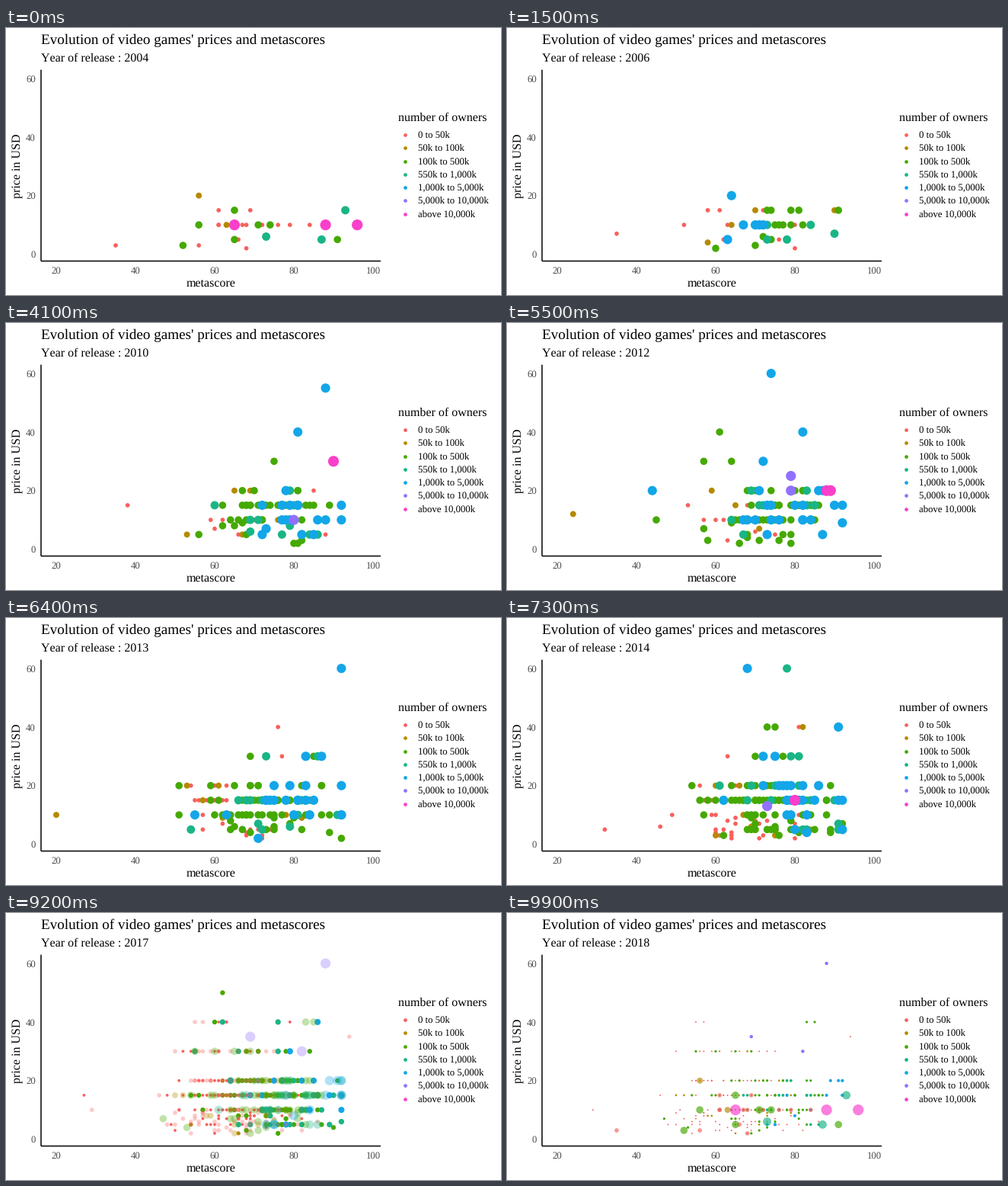
A matplotlib script for the animation above (10 s loop, 650x350 px).

```python
import matplotlib.pyplot as plt
import numpy as np
from matplotlib.animation import FuncAnimation
from matplotlib.colors import to_rgba

W, H, DPI = 650, 350, 100
PT = 72 / DPI  # points per pixel

plt.rcParams["font.family"] = "Liberation Serif"
plt.rcParams["text.hinting"] = "no_hinting"
plt.rcParams["text.kerning_factor"] = 6  # plain, unkerned spacing

OWNERS = ["0 to 50k", "50k to 100k", "100k to 500k", "550k to 1,000k",
          "1,000k to 5,000k", "5,000k to 10,000k", "above 10,000k"]
COLORS = ["#F8605C", "#B58900", "#45A900", "#1AB586",
          "#13A6E8", "#9270FF", "#FA3FCB"]
RED, GOLD, GREEN, TEAL, BLUE, PURPLE, PINK = range(7)
RGBA = np.array([to_rgba(c) for c in COLORS])
# Dot areas grow in equal steps from the smallest to the largest class.
RADII = 1.067 * np.sqrt(np.linspace(4, 36, 7)) + 0.704

YEARS = range(2004, 2019)

# Releases per owner class at a few years, interpolated in between.
KEY_YEARS = [2004, 2008, 2012, 2016, 2018]
COUNTS = {
    RED: [14, 7, 11, 110, 120],
    GOLD: [2, 6, 7, 22, 16],
    GREEN: [6, 24, 60, 85, 70],
    TEAL: [0, 10, 13, 25, 16],
    BLUE: [0, 13, 21, 30, 12],
}

# The dots that stand out: best sellers, highest prices, lowest scores.
LANDMARKS = {
    2004: [(RED, 35, 3), (GREEN, 52, 3), (TEAL, 73, 6), (TEAL, 87, 5),
           (TEAL, 93, 15), (PINK, 65, 10), (PINK, 88, 10), (PINK, 96, 10)],
    2006: [(RED, 35, 7)],
    2008: [(GREEN, 50, 2), (GREEN, 64, 40), (GREEN, 80, 30),
           (PURPLE, 89, 10)],
    2009: [(RED, 29, 10)],
    2010: [(RED, 38, 15), (BLUE, 81, 40), (BLUE, 88, 55),
           (PURPLE, 80, 10), (PINK, 90, 30)],
    2011: [(GOLD, 23, 10)],
    2012: [(GOLD, 24, 12), (BLUE, 44, 20), (BLUE, 74, 60), (BLUE, 82, 40),
           (PURPLE, 79, 20), (PURPLE, 79, 25), (PINK, 88, 20),
           (PINK, 89, 20)],
    2013: [(GOLD, 20, 10)],
    2014: [(RED, 32, 5), (BLUE, 68, 60), (TEAL, 78, 60),
           (PURPLE, 73, 13), (PINK, 80, 15)],
    2016: [(RED, 36, 10), (BLUE, 61, 60), (BLUE, 86, 60),
           (PURPLE, 71, 20), (PURPLE, 77, 15), (PURPLE, 83, 15),
           (PINK, 83, 25)],
    2017: [(RED, 27, 15)],
    2018: [(RED, 29, 10), (RED, 94, 35), (PURPLE, 69, 35),
           (PURPLE, 82, 30), (PURPLE, 88, 60)],
}
PRICES = np.array([5, 10, 15, 20, 30, 40, 50, 60])


def releases(year):
    """Rows of (owner class, metascore, price), small dots first."""
    rng = np.random.default_rng(year)
    age = year - YEARS[0]
    # Prices peak around a typical price; both it and the tail grow.
    weights = np.exp(-abs(PRICES - 10 - 0.4 * age) / (3 + 0.45 * age))
    weights /= weights.sum()
    rows = list(LANDMARKS.get(year, []))
    for owner, keys in COUNTS.items():
        n = round(np.interp(year, KEY_YEARS, keys))
        score = np.clip(rng.normal(66 + 3.5 * owner, 8.5, n).round(), 45, 92)
        price = rng.choice(PRICES, n, p=weights)
        bargain = rng.random(n) < 0.28 - 0.06 * owner
        price = np.where(bargain, rng.integers(2, 10, n), price)
        rows += zip([owner] * n, score, price)
    return np.array(sorted(rows, key=lambda row: row[0]))


def x_px(score):
    return 66 + (score - 20) * 5.2


def y_px(price):
    return 296.5 - price * 3.84


def build(year):
    owner, score, price = releases(year).T
    owner = owner.astype(int)
    xy = np.column_stack([x_px(score), y_px(price)])
    return xy, RADII[owner], RGBA[owner]


states = [build(year) for year in YEARS]

# Timeline: every year holds, then gives way to the next in three steps.
FRAMES, STEPS = 100, 3
HOLDS = [4] * 11 + [3] * 4
timeline = []
for i, hold in enumerate(HOLDS):
    timeline += [(i, 0)] * hold
    timeline += [(i, j / STEPS) for j in range(1, STEPS)]
    timeline.append(((i + 1) % len(HOLDS), 0))
timeline = timeline[:FRAMES]

fig = plt.figure(figsize=(W / DPI, H / DPI), dpi=DPI, facecolor="white")
ax = fig.add_axes([0, 0, 1, 1])
ax.set_xlim(0, W)
ax.set_ylim(H, 0)
ax.axis("off")


def label(x, y, text, size, **kw):
    return ax.text(x, y, text, fontsize=size * PT, va="baseline", **kw)


label(45.8, 21, "Evolution of video games' prices and metascores", 19.2)
subtitle = label(45.8, 44, "", 16)
label(268.7, 338.6, "metascore", 16, ha="center")
label(19.3, 180.3, "price in USD", 16, ha="center",
      rotation=90, rotation_mode="anchor")

for score in range(20, 101, 20):
    label(x_px(score), 321.8, str(score), 12.8, ha="center", color="#4D4D4D")
for price in range(0, 61, 20):
    label(38.8, y_px(price) + 4.6, str(price), 12.8, ha="right",
          color="#4D4D4D")

for xs, ys in [((46, 46), (54.7, 305.5)), ((46, 492), (305.5, 305.5))]:
    ax.plot(xs, ys, color="black", lw=1.5 * PT, solid_capstyle="butt",
            snap=False, zorder=1)

label(515.2, 121.8, "number of owners", 16)
for i, (name, color) in enumerate(zip(OWNERS, COLORS)):
    y = 140 + 17.28 * i
    ax.scatter([524.1], [y], s=(4.7 * PT) ** 2, color=color, linewidths=0)
    label(540.8, y + 4, name, 12.8)

dots = ax.scatter([], [], linewidths=0, zorder=3)


def draw(n):
    i, t = timeline[n]
    xy, radius, rgba = states[i]
    if t:
        # Leaving dots shrink while arriving ones fade in.
        new_xy, new_radius, new_rgba = states[(i + 1) % len(states)]
        new_rgba = new_rgba.copy()
        new_rgba[:, 3] = t
        xy = np.vstack([xy, new_xy])
        radius = np.concatenate([radius * (1 - t), new_radius])
        rgba = np.vstack([rgba, new_rgba])
    dots.set_offsets(xy)
    dots.set_sizes((2 * radius * PT) ** 2)
    dots.set_facecolors(rgba)
    subtitle.set_text(f"Year of release : {YEARS[i]}")
    return dots, subtitle


anim = FuncAnimation(fig, draw, frames=FRAMES, interval=100,
                     repeat=True, repeat_delay=0)
plt.show()
```
